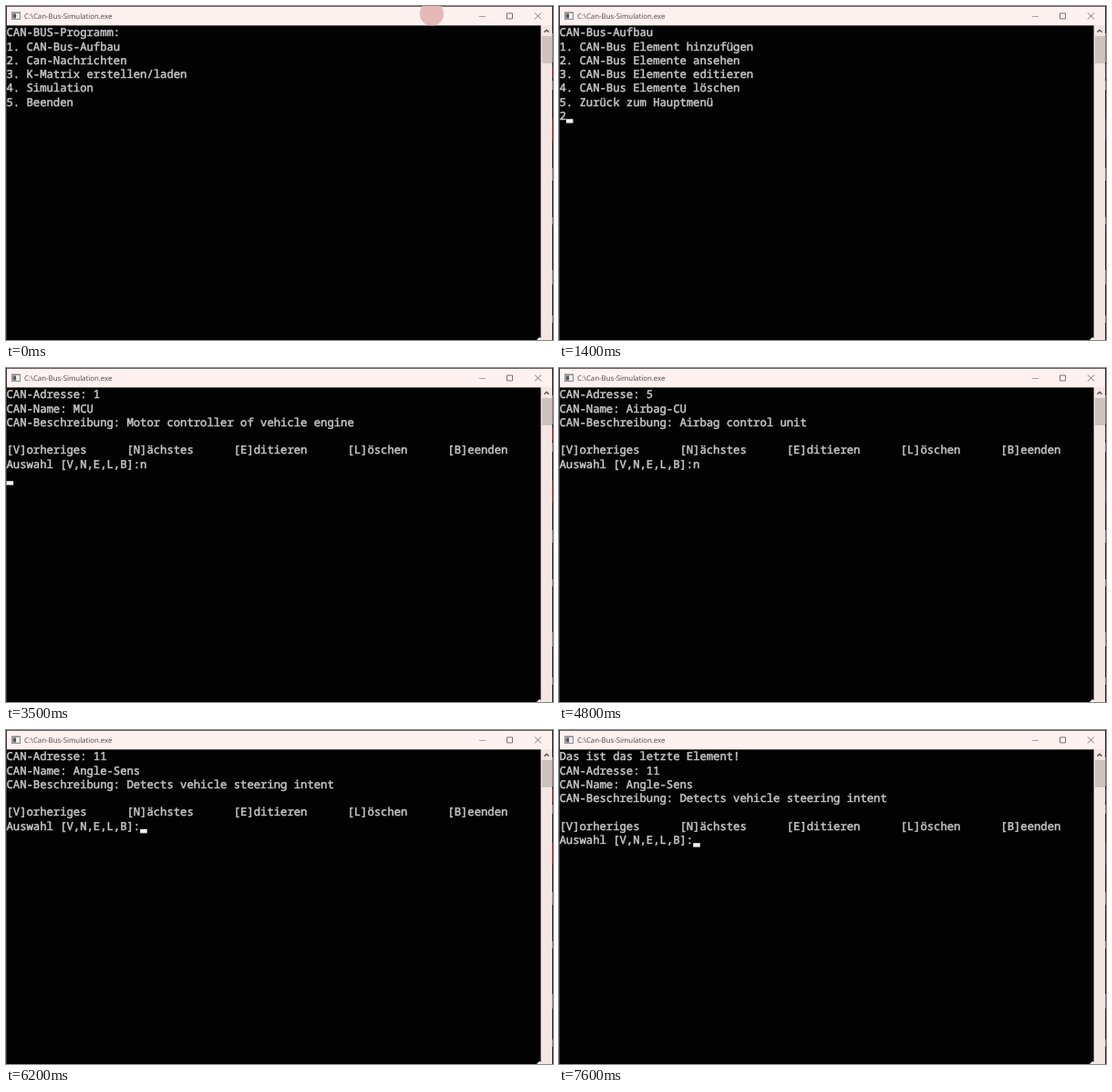
An HTML page that plays this animation: 600 by 367 pixels, repeating every 8 s.

```html
<!DOCTYPE html>
<html lang="de">
<head>
<meta charset="utf-8">
<title>Can-Bus-Simulation</title>
<style>
  html, body { margin: 0; width: 100%; height: 100%; overflow: hidden; background: #020202; }
  svg { display: block; width: 600px; height: 367px; }
  text { white-space: pre; text-rendering: geometricPrecision; }
  #lines text {
    font: 500 12.22px "Noto Sans Mono", "DejaVu Sans Mono", monospace;
    fill: #c8c6c6; stroke: #c8c6c6; stroke-width: .5px;
  }
  #title { font: 7.85px "Open Sans", "Noto Sans", sans-serif; fill: #4c4445; }
  .glyph { fill: none; stroke: #5c5455; stroke-width: .8; }
</style>
</head>
<body>
<svg viewBox="0 0 600 367">
  <rect width="600" height="367" fill="#020202"/>

  <!-- title bar -->
  <rect y="1" width="599" height="20.4" fill="#fff1f0"/>
  <rect width="600" height="1" fill="#6b6263"/>
  <rect width="1" height="367" fill="#3a3637"/>
  <clipPath id="bar"><rect y="0" width="599" height="21.4"/></clipPath>
  <circle id="click" cx="467" cy="8.5" r="13.2" fill="#e5b9ba" clip-path="url(#bar)"/>
  <rect x="6" y="6.5" width="10" height="8.5" fill="#8b8789"/>
  <rect x="7" y="8" width="8" height="6" fill="#efebec"/>
  <rect x="7.5" y="8.5" width="3.5" height="5" fill="#535a5e"/>
  <text id="title" x="20" y="13.7">C:\Can-Bus-Simulation.exe</text>
  <path class="glyph" d="M519 11.5h7" opacity=".65"/>
  <path class="glyph" d="M549.5 8h6v6h-6zM580 7.5l7 7m0-7l-7 7"/>

  <!-- scroll bar -->
  <rect x="586.6" y="21" width="12.4" height="346" fill="#f3e6e5"/>
  <rect x="588" y="33" width="11" height="30" fill="#cfc2c1"/>
  <path d="M590.5 28.8l2.5-2.5 2.5 2.5" fill="none" stroke="#4a4243" stroke-width="1.3"/>
  <path d="M582 367l3-3 2 1v2z" fill="#f3f0f0"/>

  <!-- desktop edge -->
  <rect x="599" width="1" height="367" fill="#2a2425"/>
  <path d="M599.5 30v32M599.5 82v10M599.5 178v14M599.5 232v8M599.5 290v16M599.5 340v8" stroke="#8d7d80"/>
  <path d="M599.5 65v14M599.5 124v24" stroke="#7a2f33"/>

  <g id="lines"></g>
  <rect id="cursor" width="7.6" height="4.4" fill="#f5f3f3"/>
</svg>
<script>
const LOOP = 8000, COL = 7.332, ROW = 15.25, LEFT = .5, BASE = 33.4;
const $ = id => document.getElementById(id);

const prompt = 'Auswahl [V,N,E,L,B]:';
const choices = ['[V]orheriges', '[N]ächstes', '[E]ditieren', '[L]öschen', '[B]eenden'].join(' '.repeat(6));
const menu = (head, ...items) => [head, ...items.map((s, i) => `${i + 1}. ${s}`), ''];
const element = (address, name, about) => [
  `CAN-Adresse: ${address}`, `CAN-Name: ${name}`, `CAN-Beschreibung: ${about}`, '', choices, prompt
];

const angle = element(11, 'Angle-Sens', 'Detects vehicle steering intent');
const screens = {
  main: menu('CAN-BUS-Programm:', 'CAN-Bus-Aufbau', 'Can-Nachrichten',
    'K-Matrix erstellen/laden', 'Simulation', 'Beenden'),
  setup: menu('CAN-Bus-Aufbau', 'CAN-Bus Element hinzufügen', 'CAN-Bus Elemente ansehen',
    'CAN-Bus Elemente editieren', 'CAN-Bus Elemente löschen', 'Zurück zum Hauptmenü'),
  motor: element(1, 'MCU', 'Motor controller of vehicle engine'),
  airbag: element(5, 'Airbag-CU', 'Airbag control unit'),
  brake: element(8, 'Brake-CU', 'Brake control unit'),
  angle,
  last: ['Das ist das letzte Element!', ...angle]
};

// start time, screen, typed input, cursor
const OFF = 0, ON = 1, NEXT = 2;
const steps = [
  [0, 'main', '', OFF], [200, 'main', '', ON], [500, 'main', '1', ON], [600, 'main', '1', NEXT],
  [700, 'setup', '', ON], [1200, 'setup', '', OFF], [1400, 'setup', '2', ON], [1600, 'setup', '2', NEXT],
  [1700, 'motor', '', ON], [2100, 'motor', '', OFF], [2400, 'motor', '', ON], [2700, 'motor', '', OFF],
  [3000, 'motor', '', ON], [3200, 'motor', 'n', ON], [3500, 'motor', 'n', NEXT],
  [3600, 'airbag', '', ON], [3900, 'airbag', '', OFF], [4200, 'airbag', '', ON], [4500, 'airbag', '', OFF],
  [4800, 'airbag', 'n', OFF], [5100, 'brake', '', ON], [5700, 'brake', '', OFF],
  [5900, 'brake', 'n', ON], [6000, 'brake', 'n', NEXT],
  [6100, 'angle', '', ON], [6600, 'angle', '', OFF], [6900, 'angle', 'n', ON], [7200, 'angle', 'n', OFF],
  [7400, 'angle', 'n', NEXT], [7500, 'last', '', ON]
];

const rows = Array.from({ length: 8 }, (_, i) => {
  const row = document.createElementNS('http://www.w3.org/2000/svg', 'text');
  row.setAttribute('x', LEFT);
  row.setAttribute('y', BASE + i * ROW);
  return $('lines').appendChild(row);
});

function show([, name, typed, cursor]) {
  const lines = screens[name], end = lines.length - 1;
  rows.forEach((row, i) => row.textContent = (lines[i] || '') + (i === end ? typed : ''));
  const col = cursor === NEXT ? 0 : lines[end].length + typed.length;
  const line = cursor === NEXT ? end + 1 : end;
  $('cursor').setAttribute('x', LEFT + col * COL);
  $('cursor').setAttribute('y', BASE - .7 + line * ROW);
  $('cursor').setAttribute('visibility', cursor ? 'visible' : 'hidden');
}

let current;
function tick() {
  const t = performance.now() % LOOP;
  const step = steps.findLast(s => s[0] <= t);
  if (step !== current) show(current = step);
  $('click').setAttribute('opacity', t < 200 ? 1 : t < 300 ? .4 : 0);
  requestAnimationFrame(tick);
}
tick();
</script>
</body>
</html>
```
